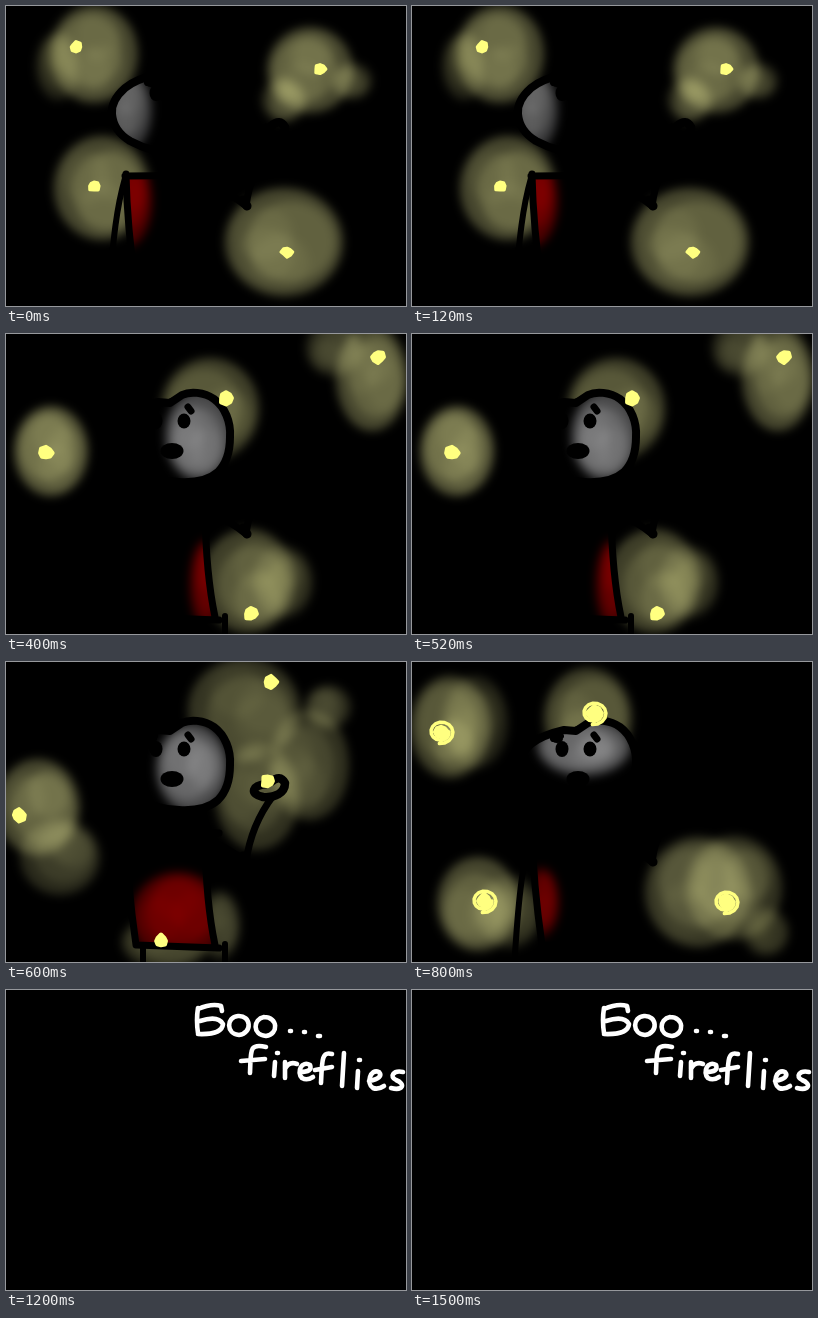
An HTML page that plays this animation: 400 px wide and 300 px high, repeating every 1700 ms.

```html
<!DOCTYPE html>
<html lang="en">
<head>
<meta charset="utf-8">
<title>Fireflies</title>
<style>
html, body { margin: 0; width: 100%; height: 100%; overflow: hidden; background: #000; }
svg { display: block; width: 100%; height: 100%; }
</style>
</head>
<body>
<svg id="stage" viewBox="0 0 400 300" preserveAspectRatio="none">
  <defs>
    <filter id="soft" filterUnits="userSpaceOnUse" x="-60" y="-60" width="520" height="420" color-interpolation-filters="sRGB">
      <feGaussianBlur stdDeviation="5"/>
    </filter>
    <path id="head" d="M164 69 L152 68 C139 71 127 75 119 82 C110 90 105 99 106 108 C107 120 114 129 124 135 C137 142 152 147 173 148 C190 149 203 146 212 138 C220 130 224 117 224 103 C225 88 219 73 208 65 C198 58 184 57 176 61 Z"/>
    <path id="body" d="M120 171 H199 Q200 240 208 284 L130 283 Q121 220 120 171 Z"/>
    <clipPath id="inHead"><use href="#head"/></clipPath>
    <clipPath id="inBody"><use href="#body"/></clipPath>
    <g id="lines" fill="none" stroke="#000" stroke-width="6" stroke-linecap="round" stroke-linejoin="round">
      <use href="#head" stroke-width="8"/>
      <path d="M141 77 L149 74 M160 69 L168 66"/>
      <path stroke-width="7" d="M182 73 L185 77"/>
      <path d="M168 148 V170 M119 172 C111 200 107 230 103 292 M137 286 V302 M219 282 V302"/>
      <path stroke-width="7" d="M119 170 Q165 169 213 171 M120 168 Q121 220 130 283 M199 178 Q200 240 209 283 M130 283 L213 286"/>
      <path stroke-width="7" d="M206 180 Q224 187 240 200 Q245 163 267 134"/>
      <path stroke-width="9" d="M237 194 L241 200"/>
      <path stroke-width="8.5" d="M265 120 Q274 112 279 121 C279 131 269 136 257 135 C243 132 246 123 261 122"/>
      <g fill="#000" stroke="none">
        <ellipse cx="150" cy="87" rx="6.5" ry="8"/>
        <ellipse cx="178" cy="87" rx="6.5" ry="7.5"/>
        <ellipse cx="166" cy="117" rx="11.5" ry="8"/>
        <ellipse cx="145" cy="77" rx="6" ry="4"/>
      </g>
    </g>
  </defs>
  <rect width="400" height="300"/>
</svg>
<script>
// Each light is [x, y, rx, ry, strength = 1]; each firefly is [x, y].
const scenes = [
  {
    glow: [[88, 48, 44, 49], [52, 60, 22, 34, .5], [96, 182, 48, 52], [304, 64, 43, 43], [278, 94, 22, 22, .7],
      [346, 75, 20, 18, .6], [278, 236, 59, 54]],
    head: [[122, 104, 24, 40, .7]],
    body: [[122, 194, 24, 46]],
    flies: [[70, 41], [314, 63], [88, 180], [281, 246]], size: 7.5
  },
  {
    glow: [[131, 78, 45, 53, .9], [352, 103, 44, 49], [338, 52, 30, 30, .6], [306, 112, 31, 34, .6],
      [43, 241, 38, 44], [74, 247, 24, 30, .5], [18, 215, 13, 40, .5], [214, 219, 27, 51]],
    head: [[153, 100, 47, 44]],
    body: [[183, 217, 40, 44, .85]],
    flies: [[135, 77], [359, 100], [34, 244], [190, 236]], size: 7.5
  },
  {
    glow: [[45, 117, 37, 45, 1.2], [204, 75, 49, 51, .9], [366, 44, 36, 53], [328, 14, 28, 28, .6],
      [242, 247, 47, 52, .9], [277, 248, 30, 36, .5]],
    head: [[193, 102, 34, 45, .9]],
    body: [[200, 250, 16, 44]],
    flies: [[220, 64], [372, 23], [245, 280], [40, 119]], size: 9
  },
  {
    glow: [[238, 48, 56, 52, .75], [322, 45, 23, 22, .6], [303, 103, 40, 55, .7], [251, 135, 42, 53, .7],
      [32, 145, 42, 48], [54, 195, 40, 38, .6], [160, 280, 44, 27, .7], [214, 263, 20, 34, .6]],
    head: [[186, 106, 36, 45, .9]],
    body: [[172, 255, 47, 45]],
    flies: [[265, 20], [13, 153], [262, 119], [155, 279]], size: 9
  },
  {
    glow: [[38, 65, 40, 51, .9], [63, 60, 33, 46, .5], [176, 56, 44, 50, .9], [66, 242, 41, 47],
      [98, 250, 32, 36, .5], [286, 230, 53, 55, .8], [322, 226, 48, 52, .7], [354, 270, 23, 24, .5]],
    head: [[172, 84, 47, 30, .9]],
    body: [[130, 240, 17, 34, .9]],
    flies: [[29, 70], [182, 51], [72, 239], [314, 240]], size: 10, curls: true
  },
  {
    glow: [[103, 24, 39, 47, .9], [120, 134, 31, 46, .8], [170, 155, 40, 22, .7], [221, 180, 39, 48, .8],
      [221, 236, 24, 44, .6], [256, 175, 33, 50, .5], [314, 172, 41, 54, .9], [360, 174, 18, 58, .5]],
    head: [[135, 110, 34, 44, .8], [186, 136, 46, 22, .65]],
    body: [[141, 212, 28, 56, .55], [182, 215, 30, 62, .65]],
    flies: [[105, 11], [120, 132], [236, 181], [345, 160]], size: 12
  }
];

const lettering = [
  'M192 18 Q190 30 192 43 M192 19 Q206 13 215 16 L216 21 M194 31 Q212 25 217 34 Q216 45 192 44',
  'M232 26 C220 27 220 44 233 45 C247 43 245 25 232 26',
  'M258 27 C247 29 246 45 260 46 C273 44 272 27 258 27',
  'M284 41 h1 M298 42 h1 M312 46 h2',
  'M260 57 C243 53 245 60 244 83 M235 71 L259 69',
  'M269 72 L268 86 M271 63 h1',
  'M279 72 V88 M279 79 Q283 71 291 74',
  'M294 82 Q307 82 304 75 C296 70 290 82 296 88 Q301 91 307 87',
  'M326 64 C316 61 316 69 315 93 M309 80 L326 77',
  'M338 63 L336 96',
  'M352 81 L351 98 M353 70 h1',
  'M363 91 Q378 88 373 82 C364 78 360 94 367 98 Q372 100 378 96',
  'M397 82 C387 80 383 87 390 90 C400 94 397 101 385 98'
];

const ns = 'http://www.w3.org/2000/svg';
const stage = document.getElementById('stage');

function add(parent, tag, attrs = {}) {
  const el = document.createElementNS(ns, tag);
  for (const key in attrs) el.setAttribute(key, attrs[key]);
  return parent.appendChild(el);
}

function seeded(seed) {
  return () => (seed = (seed * 16807) % 2147483647) / 2147483647;
}

function addStroke(parent, d, width, color, fill = 'none') {
  add(parent, 'path', {
    d, fill, stroke: color, 'stroke-width': width,
    'stroke-linecap': 'round', 'stroke-linejoin': 'round'
  });
}

// A soft pool of light: a wide wash, an inner core and a few loose brush dabs.
function addLights(parent, lights, color, power, random, clip) {
  const outer = add(parent, 'g', clip ? { 'clip-path': `url(#${clip})` } : {});
  const group = add(outer, 'g', { filter: 'url(#soft)' });
  for (const [x, y, rx, ry, strength = 1] of lights) {
    const dab = (shift, scale, alpha) => {
      const angle = random() * 2 * Math.PI;
      add(group, 'ellipse', {
        cx: x + Math.cos(angle) * shift * rx, cy: y + Math.sin(angle) * shift * ry,
        rx: rx * scale, ry: ry * scale, fill: color, 'fill-opacity': alpha * power * strength
      });
    };
    dab(0, 1, .27);
    dab(.12, .75, .15);
    for (let i = 0; i < 3; i++) dab(.38, .5, .06);
  }
}

// Points on a turning radius, joined into a path.
function around(x, y, count, step, radius) {
  const points = Array.from({ length: count }, (_, i) => {
    const r = radius(i);
    return `${x + Math.cos(i * step) * r} ${y + Math.sin(i * step) * r * .9}`;
  });
  return 'M' + points.join(' L');
}

function addFly(parent, [x, y], size, curls, random) {
  const yellow = '#ffff80';
  const blob = around(x, y, 8, Math.PI / 4, () => size * (.5 + random() * .3)) + ' Z';
  addStroke(parent, blob, size * .45, yellow, yellow);
  if (curls) addStroke(parent, around(x, y, 20, .42, i => size * (.8 + i / 38)), 3.5, yellow);
}

function buildScene({ glow, head, body, flies, size, curls }, index) {
  const group = add(stage, 'g');
  const random = seeded(index * 977 + 4201);
  addLights(group, glow, '#ffffa5', 1, random);
  add(group, 'use', { href: '#head' });
  add(group, 'use', { href: '#body' });
  addLights(group, head, '#f4f4f8', 1.25, random, 'inHead');
  addLights(group, body, '#c80000', 1.4, random, 'inBody');
  add(group, 'use', { href: '#lines' });
  for (const fly of flies) addFly(group, fly, size, curls, random);
  return group;
}

function buildLettering() {
  const group = add(stage, 'g', { role: 'img', 'aria-label': 'Boo... fireflies' });
  for (const d of lettering) addStroke(group, d, 4.6, '#fff');
  return group;
}

const views = [...scenes.map(buildScene), buildLettering()];
const step = 200, loop = 1700;
const start = performance.now();

function draw(now) {
  const time = Math.max(0, now - start) % loop;
  const current = Math.min(views.length - 1, Math.floor(time / step));
  views.forEach((view, i) => view.setAttribute('display', i === current ? 'inline' : 'none'));
  requestAnimationFrame(draw);
}
draw(start);
</script>
</body>
</html>
```
